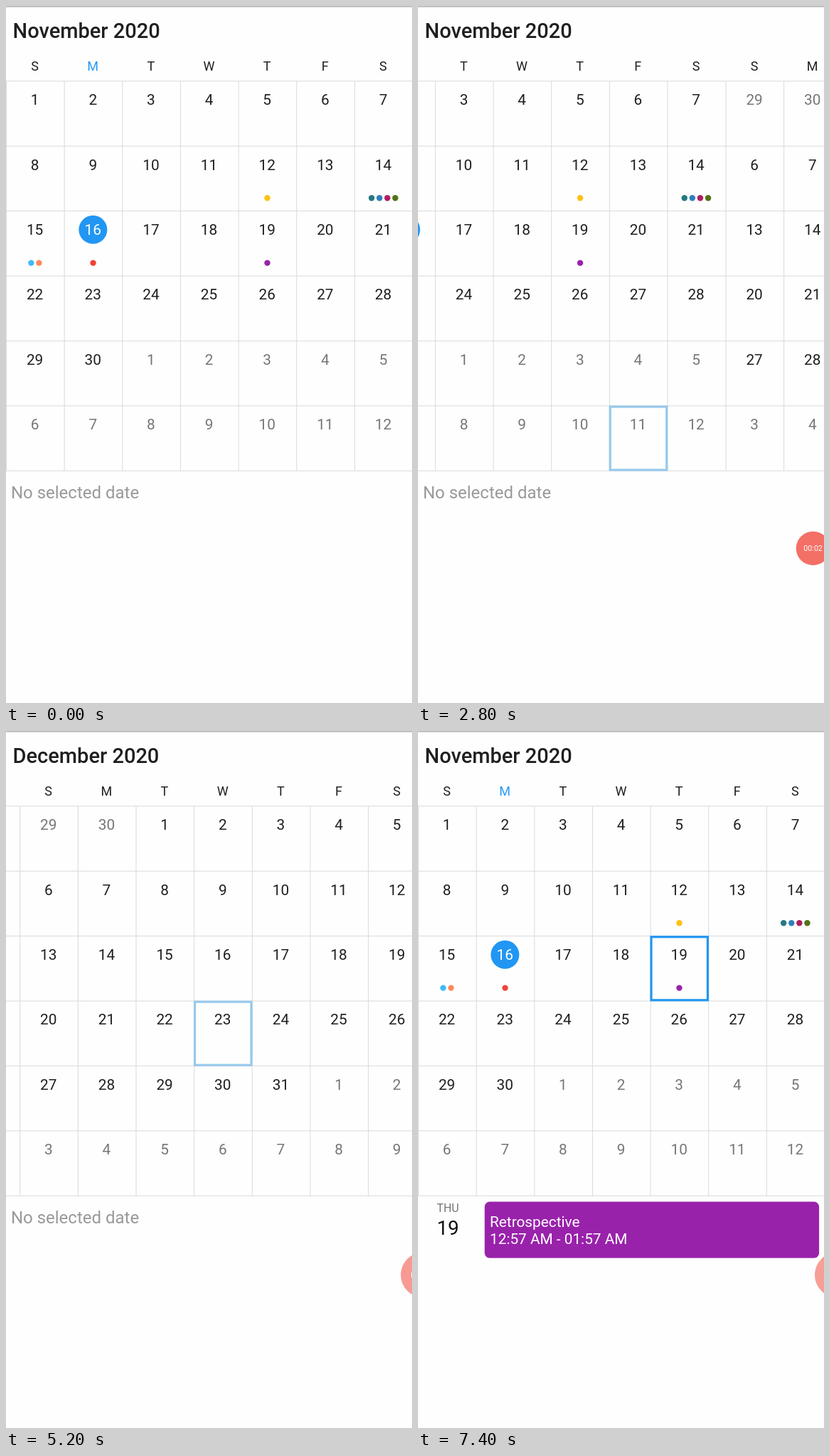
An HTML page that plays this animation: 571x981 px, repeating every 8000 ms.

```html
<!DOCTYPE html>
<html lang="en">
<head>
<meta charset="utf-8">
<title>Month calendar</title>
<style>
  html, body { margin: 0; width: 100%; height: 100%; overflow: hidden; background: #fdfefd; }
  svg { display: block; width: 571px; height: 981px; font-family: Roboto, sans-serif; }
  text { white-space: pre; fill: #1f1f1f; }
  .mid { text-anchor: middle; }
  .title { font-size: 29px; font-weight: 500; }
  .weekday { font-size: 18px; }
  .day { font-size: 20.8px; }
  .outside { fill: #767676; }
  .white { fill: #fff; }
  .empty { font-size: 24px; fill: #999; }
  .name { font-size: 15.8px; fill: #757575; }
  .date { font-size: 27.8px; fill: #111; }
  .box { fill: none; stroke-width: 3.2; }
  .grid { fill: none; stroke: #d9dad9; }
</style>
</head>
<body>
<svg id="stage" viewBox="0 0 571 981"></svg>
<script>
const LOOP = 8000, STEP = 100;
const COL = 81.65, ROW = 91.4, LEFT = 0.3, TOP = 105.8, PAGE = 571.9;
const BLUE = '#2196f3', HOVER = '#97c9ec';
const TEAL = '#277782', OCEAN = '#2f80b7', BERRY = '#b01c62', OLIVE = '#507416', PURPLE = '#9922ab';

const stage = document.getElementById('stage');

function add(parent, tag, attrs = {}, content) {
  const node = document.createElementNS('http://www.w3.org/2000/svg', tag);
  for (const key in attrs) node.setAttribute(key, attrs[key]);
  if (content !== undefined) node.textContent = content;
  return parent.appendChild(node);
}
const label = (parent, x, y, cls, content) => add(parent, 'text', { x, y, class: cls }, content);
const show = (node, on) => node.setAttribute('visibility', on ? 'visible' : 'hidden');

const cellX = cell => LEFT + (cell % 7) * COL;
const cellY = cell => TOP + Math.floor(cell / 7) * ROW;

// A month page: first = weekday of the 1st, before / length = days in previous / this month
function buildPage({ x, first, before, length, today, dots }) {
  const page = add(pages, 'g', { transform: `translate(${x})` });
  let lines = '';
  for (let i = 0; i < 7; i++) {
    lines += `M${LEFT + i * COL + 0.2} ${TOP}v${6 * ROW}M0 ${TOP + i * ROW}h${PAGE}`;
    label(page, 40.5 + i * COL, 91.3, 'mid weekday', 'SMTWTFS'[i])
      .style.fill = today !== undefined && i === today % 7 ? BLUE : '';
  }
  add(page, 'path', { d: lines, class: 'grid' });

  for (let cell = 0; cell < 42; cell++) {
    const cx = cellX(cell) + 40.3, y = cellY(cell), n = cell - first + 1;
    const inside = n >= 1 && n <= length;
    const day = n < 1 ? before + n : inside ? n : n - length;
    if (cell === today) add(page, 'circle', { cx: cx + 0.1, cy: y + 26.2, r: 20, fill: BLUE });
    label(page, cx, y + 33.3, 'mid day' + (cell === today ? ' white' : inside ? '' : ' outside'), day);
    const colors = inside && dots[n] || [];
    colors.forEach((fill, i) => add(page, 'circle', {
      cx: cx + 0.3 + (i - (colors.length - 1) / 2) * 11.1, cy: y + 73, r: 4.2, fill
    }));
  }
  const box = add(page, 'rect', { class: 'box', width: COL - 2.2, height: ROW - 2.4 });
  return { box };
}

function buildAgenda(name, date, events) {
  const group = add(stage, 'g');
  label(group, 42, 677, 'mid name', name);
  label(group, 42, 708.5, 'mid date', date);
  events.forEach(([fill, subject, hours], i) => {
    const y = 662.6 + i * 87.5;
    add(group, 'rect', { x: 93.7, y, width: 470.4, height: 79.2, rx: 7, fill });
    label(group, 101, y + 35.4, 'day white', subject);
    label(group, 101, y + 59.4, 'day white', hours);
  });
  return group;
}

add(stage, 'rect', { width: 571, height: 1.6, fill: '#b6b6b6' });
const title = label(stage, 9.6, 44.8, 'title', '');
const pages = add(stage, 'g');
const months = [
  buildPage({
    x: 0, first: 0, before: 31, length: 30, today: 15,
    dots: {
      12: ['#fdc115'], 14: [TEAL, OCEAN, BERRY, OLIVE], 15: ['#40b9fa', '#ff8a5b'],
      16: ['#f04235'], 19: [PURPLE]
    }
  }),
  buildPage({ x: PAGE, first: 2, before: 30, length: 31, dots: {} })
];
const empty = label(stage, 6.9, 693, 'empty', 'No selected date');
const saturday = buildAgenda('SAT', 14, [
  [TEAL, 'Project Release Meeting   Istanbul, Turkey', '07:57 PM - 08:57 PM'],
  [OCEAN, 'Support - Web Meeting   Dubai, UAE', '08:57 PM - 09:57 PM'],
  [BERRY, 'Project Plan Meeting   Kuala Lumpur, Malaysia', '09:57 PM - 10:57 PM'],
  [OLIVE, 'Development Meeting   New York, U.S.A', '10:57 PM - 11:57 PM']
]);
const thursday = buildAgenda('THU', 19, [[PURPLE, 'Retrospective', '12:57 AM - 01:57 AM']]);

const recorder = add(stage, 'g');
add(recorder, 'circle', { r: 31.8, fill: '#f24033' });
const clock = label(recorder, 0, 5, 'mid white', '');
clock.style.fontSize = '14.2px';

// [time, value...] rows, linear in between
const SCROLL = [
  [1900, 0], [2000, 40], [2100, 200], [2200, 400], [2300, 530], [2400, PAGE],
  [2500, PAGE], [2600, 480], [2700, 330], [2800, 139.4], [2900, 40], [3000, 0],
  [4700, 0], [4800, 40], [4900, 200], [5000, 400], [5100, 510], [5200, PAGE - 19.2], [5300, PAGE],
  [6300, PAGE], [6400, 480], [6500, 330], [6600, 139.4], [6700, 40], [6800, 0]
];
// x, y, scale, opacity
const RECORDER = [
  [2100, 537, 765.5, 1, 1], [2400, 555.6, 763.3, 0.75, 0.75],
  [4900, 555.6, 763.3, 0.75, 0.75], [5200, 587, 765.5, 1, 0.52], [5400, 589.8, 765.5, 1, 0.5]
];
// from, to, month, cell, color
const BOXES = [
  [2000, 2200, 0, 40, HOVER], [2500, 2800, 1, 38, HOVER], [2800, 3000, 0, 40, HOVER],
  [3800, 3900, 0, 13, HOVER], [3900, 5000, 0, 13, BLUE], [5000, 5300, 1, 24, HOVER],
  [6300, 6600, 1, 31, HOVER], [6600, 6800, 0, 33, HOVER],
  [7200, 7300, 0, 18, HOVER], [7300, LOOP, 0, 18, BLUE]
];
const within = (t, from, to) => t >= from && t < to;

function sample(rows, t) {
  const next = rows.findIndex(row => row[0] > t);
  if (next === 0) return rows[0].slice(1);
  if (next < 0) return rows[rows.length - 1].slice(1);
  const a = rows[next - 1], b = rows[next], k = (t - a[0]) / (b[0] - a[0]);
  return a.slice(1).map((v, i) => v + (b[i + 1] - v) * k);
}

function draw(t) {
  const december = within(t, 2200, 2800) || within(t, 5000, 6600);
  title.textContent = (december ? 'December' : 'November') + ' 2020';
  pages.setAttribute('transform', `translate(${-sample(SCROLL, t)[0]})`);

  months.forEach(({ box }, month) => {
    const active = BOXES.find(([from, to, m]) => m === month && within(t, from, to));
    show(box, active);
    if (!active) return;
    box.setAttribute('x', cellX(active[3]) + 1.1);
    box.setAttribute('y', cellY(active[3]) + 1.2);
    box.setAttribute('stroke', active[4]);
  });

  const onSaturday = within(t, 3900, 5000), onThursday = t >= 7300;
  show(saturday, onSaturday);
  show(thursday, onThursday);
  show(empty, !onSaturday && !onThursday);

  const [x, y, scale, opacity] = sample(RECORDER, t);
  show(recorder, t >= 100);
  recorder.setAttribute('transform', `translate(${x} ${y}) scale(${scale})`);
  recorder.setAttribute('opacity', opacity);
  clock.textContent = '00:0' + Math.max(0, Math.floor((t - 100) / 1000));
}

function tick() {
  const t = performance.now() % LOOP;
  draw(Math.floor(t / STEP) * STEP);
  requestAnimationFrame(tick);
}
tick();
</script>
</body>
</html>
```
